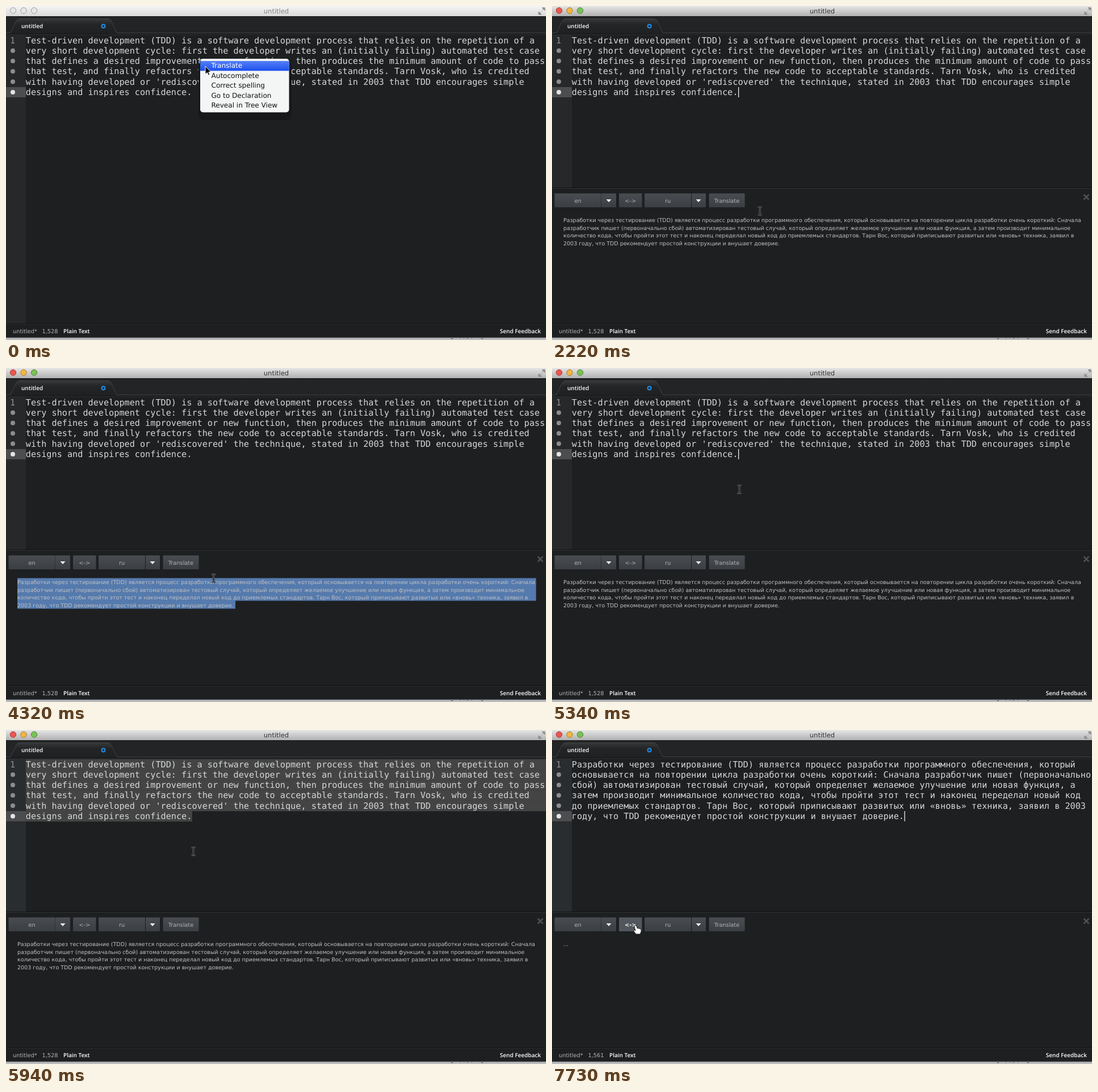
Recreate the animation shown at these times as an HTML page. Size 951x589 px, loop 8 s.

```html
<!DOCTYPE html>
<html lang="en">
<head>
<meta charset="utf-8">
<title>Editor translation panel</title>
<style>
html, body { margin: 0; width: 100%; height: 100%; overflow: hidden; background: #1d1f21; }
svg { display: block; width: 951px; height: 589px; }
text { font: 9.8px "DejaVu Sans", sans-serif; fill: #b2b5b7; text-rendering: geometricPrecision; white-space: pre; }
.code { font: 15.2px "DejaVu Sans Mono", monospace; fill: #d6d8d8; }
.bold { font: 600 10px "Open Sans", sans-serif; fill: #fff; }
.mid { text-anchor: middle; }
#menu text { font-size: 12.05px; fill: #111; }
#title { font-size: 11.5px; }
#result { font-size: 9.5px; fill: #bfc1c2; }
</style>
</head>
<body>
<svg viewBox="0 0 951 589">
  <defs>
    <linearGradient id="idle" x2="0" y2="1"><stop stop-color="#f5f5f5"/><stop offset="1" stop-color="#d9d9d9"/></linearGradient>
    <linearGradient id="live" x2="0" y2="1"><stop stop-color="#e6e6e6"/><stop offset="1" stop-color="#b0b0b0"/></linearGradient>
    <linearGradient id="tab" x2="0" y2="1"><stop stop-color="#36383a"/><stop offset=".35" stop-color="#232527"/><stop offset="1" stop-color="#1d1f21"/></linearGradient>
    <linearGradient id="btn" x2="0" y2="1"><stop stop-color="#494d51"/><stop offset="1" stop-color="#3b3f43"/></linearGradient>
    <linearGradient id="blue" x2="0" y2="1"><stop stop-color="#5580f6"/><stop offset="1" stop-color="#1c50ee"/></linearGradient>
  </defs>
  <rect width="951" height="589" fill="#1d1f21"/>

  <rect id="bar" width="951" height="18"/>
  <g id="lights"></g>
  <text id="title" class="mid" x="476" y="12.7">untitled</text>
  <path d="M944 3h5v5zM938 10v5h5zM948 4l-4 4M939 14l4-4" fill="#8b8b8b" stroke="#8b8b8b"/>

  <rect y="18" width="951" height="32" fill="#222426"/>
  <rect y="18" width="951" height="1" fill="#121314"/>
  <path d="M0 47.500H8L18 26Q20 22.500 24 22.500H179Q183 22.500 185 26L195 47.500H951V51H0Z" fill="url(#tab)" stroke="#3f4244"/>
  <path d="M0 49.500H951" stroke="#141516"/>
  <text class="bold" x="27" y="38.500">untitled</text>
  <circle cx="171.500" cy="35.500" r="3" fill="none" stroke="#1d8fea" stroke-width="2"/>

  <rect y="51" width="951" height="510" fill="#1d1f21"/>
  <rect y="51" width="35" height="510" fill="#262829"/>
  <rect id="gutter" y="51" height="510" fill="#2a2d30"/>
  <rect y="143" width="35" height="18" fill="#4b4d4f"/>
  <g id="dots"></g>
  <text class="code" x="7" y="65.500" style="fill:#8e9092">1</text>
  <g id="picked" fill="#444"></g>
  <text id="code" class="code"></text>
  <rect id="caret" y="143" width="1.200" height="18" fill="#fff"/>

  <g id="panel">
    <rect y="320" width="951" height="242" fill="#1d1f21"/>
    <rect y="320" width="951" height="1" fill="#0e0f10"/>
    <rect y="321" width="951" height="1" fill="#343638"/>
    <g id="buttons"></g>
    <path d="M95.500 341h9l-4.500 5zM253.500 341h9l-4.500 5z" fill="#f2f2f2"/>
    <path d="M936.500 332.500l9 9m0-9l-9 9" stroke="#4d4f51" stroke-width="2.600"/>
    <path id="marked" d="M20 370.500H933.500V410.500H404V424.500H20Z" fill="#557aad"/>
    <text id="result"></text>
    <rect id="caret2" x="365" y="370" width="1" height="13" fill="#bbb"/>
  </g>

  <rect y="560" width="951" height="1" fill="#111213"/>
  <rect y="561" width="951" height="1" fill="#2b2d2f"/>
  <text x="12" y="577">untitled*</text>
  <text id="count" x="63.500" y="577"></text>
  <text class="bold" x="101" y="577">Plain Text</text>
  <text class="bold" x="942" y="577" text-anchor="end">Send Feedback</text>
  <rect y="585" width="951" height="4" fill="#b9bbbc"/>
  <rect y="584.500" width="951" height="1" fill="#77797a"/>
  <path d="M784 586.500h3M799 586h1M806 586h1M812 586h2M820 586h1M837 586.500h3" stroke="#444"/>

  <g id="menu">
    <rect x="339" y="97" width="164" height="104" rx="9" fill="#17181a"/>
    <rect x="342" y="93" width="156.500" height="94.500" rx="5" fill="#f4f5f5"/>
    <rect id="hot" x="342" y="97" width="156.500" height="17.300" fill="url(#blue)"/>
  </g>

  <g id="pointer">
    <path id="arrow" d="M0 0V14.500L3.400 11.400L5.700 16.300L8 15.200L5.700 10.500H10Z" fill="#050505" stroke="#fff"/>
    <g id="beam" fill="none">
      <path id="stem" d="M-3.500-7Q0-7 0-5Q0-7 3.500-7M0-5V5M-3.500 7Q0 7 0 5Q0 7 3.500 7M-2 2H2" stroke="#777" stroke-width="2.600"/>
      <use href="#stem" style="display:none"/>
      <path d="M-3.500-7Q0-7 0-5Q0-7 3.500-7M0-5V5M-3.500 7Q0 7 0 5Q0 7 3.500 7M-2 2H2" stroke="#111"/>
    </g>
    <path id="hand" d="M-1 0Q1-1 2 1L3.500 5Q5 3.500 6.200 5.200Q7.800 4.300 8.500 6Q10 5.500 10 7.500V11L8 15H1L-3 10Q-4 7.500-2 7.500L0 9L-2 2Q-2.200.500-1 0Z" fill="#fff" stroke="#111"/>
  </g>
</svg>
<script>
const LOOP = 8000, STEP = 148.6, ROW = 18.3, COL = 9.151;
const english = "Test-driven development (TDD) is a software development process that relies on the repetition of a very short development cycle: first the developer writes an (initially failing) automated test case that defines a desired improvement or new function, then produces the minimum amount of code to pass that test, and finally refactors the new code to acceptable standards. Tarn Vosk, who is credited with having developed or 'rediscovered' the technique, stated in 2003 that TDD encourages simple designs and inspires confidence.";
const russian = "Разработки через тестирование (TDD) является процесс разработки программного обеспечения, который основывается на повторении цикла разработки очень короткий: Сначала разработчик пишет (первоначально сбой) автоматизирован тестовый случай, который определяет желаемое улучшение или новая функция, а затем производит минимальное количество кода, чтобы пройти этот тест и наконец переделал новый код до приемлемых стандартов. Тарн Вос, который приписывают развитых или «вновь» техника, заявил в 2003 году, что TDD рекомендует простой конструкции и внушает доверие.";

const $ = id => document.getElementById(id);
const show = (id, on) => $(id).style.display = on ? "" : "none";
const set = (id, attrs) => { for (const k in attrs) $(id).setAttribute(k, attrs[k]); };
const add = (id, markup) => $(id).insertAdjacentHTML("beforeend", markup);
const wrap = (s, n) => s.match(new RegExp(`.{1,${n}}(?: |$)`, "g")).map(l => l.trimEnd());
const lines = (rows, x, y, pitch) => rows.map((r, i) =>
  `<tspan x="${x}" y="${y + i * pitch}">${r}</tspan>`).join("");

const code = [english, russian].map(s => lines(wrap(s, 100), 34.800, 65.500, ROW));
const translation = lines(wrap(russian, 166), 20, 381, 13.700);
const waiting = lines(["..."], 20, 381, 0);

for (let i = 0; i < 6; i++) {
  if (i) add("dots", `<circle cx="12" cy="${60.4 + i * ROW}" r="4" fill="${i < 5 ? "#8b8d8e" : "#e4e4e4"}"/>`);
  add("picked", `<rect x="35" y="${51.500 + i * ROW}" width="${i < 5 ? 916 : 32 * COL}" height="18.500"/>`);
}
for (const x of [12.500, 31, 49.500]) add("lights", `<circle cx="${x}" cy="8" r="5.200"/>`);
["Translate", "Autocomplete", "Correct spelling", "Go to Declaration", "Reveal in Tree View"].forEach((s, i) =>
  add("menu", `<text x="361.500" y="${109.300 + i * 17.400}">${s}</text>`));
[[4.500, 82, "en"], [87, 26, ""], [118, 40.500, "&lt;-&gt;", "swap"], [163, 82, "ru"], [246, 25, ""], [276.500, 63, "Translate"]]
  .forEach(([x, w, s, id = ""]) => add("buttons", `<g id="${id}"><rect x="${x}" y="330.500" width="${w}" height="24.500" rx="1" fill="url(#btn)"/>
    <text class="mid" x="${x + w / 2}" y="346.500">${s}</text></g>`));

// Pointer path: time, x, y
const path = [[0, 351, 106], [1400, 351, 106], [2370, 367, 377], [4250, 367, 377],
  [4760, 330, 214], [6400, 330, 214], [7130, 147, 345], [LOOP, 147, 345]];

function pointerAt(t) {
  const i = path.findIndex(p => p[0] > t);
  const [t0, x0, y0] = path[i - 1], [t1, x1, y1] = path[i];
  const u = (t - t0) / (t1 - t0), e = u * u * (3 - 2 * u);
  return [x0 + (x1 - x0) * e, y0 + (y1 - y0) * e];
}

const cache = {};
function fill(id, markup) {
  if (cache[id] !== markup) $(id).innerHTML = cache[id] = markup;
}

function draw(t) {
  const within = (a, b) => t >= a && t < b;
  const active = t >= 1930, pasted = t >= 6390;

  set("bar", { fill: active ? "url(#live)" : "url(#idle)" });
  $("title").style.fill = active ? "#333" : "#858585";
  [...$("lights").children].forEach((c, i) => {
    c.setAttribute("fill", active ? ["#ee5550", "#f3b640", "#79c257"][i] : "#e6e6e6");
    c.setAttribute("stroke", active ? ["#a8403c", "#a87c2c", "#4d8638"][i] : "#9b9b9b");
  });

  show("menu", t < 440);
  show("hot", t < 290);
  $("menu").querySelector("text").style.fill = t < 290 ? "#fff" : "#111";

  set("gutter", t < 5940 ? { x: 20, width: t < 5490 ? 0 : 15 } : { x: 0, width: 35 });
  show("picked", within(5940, 6390));
  fill("code", code[+pasted]);
  fill("count", pasted ? "1,561" : "1,528");
  set("caret", { x: pasted ? 620.500 : 328 });
  show("caret", within(1930, 2670) || within(5050, 5490) || within(6390, 7130) || t >= 7730);

  show("panel", t >= 890);
  show("marked", within(3420, 5050));
  show("caret2", within(2970, 3420));
  fill("result", within(1190, 7430) ? translation : waiting);

  const [x, y] = pointerAt(Math.min(LOOP - 1, Math.floor((t + 8) / STEP) * STEP));
  const hover = t > 6400 && x < 159 && y > 330;
  const beam = active && !hover && (t < 6400 || y < 320);
  set("pointer", { transform: `translate(${x} ${y})` });
  show("hand", hover);
  show("beam", beam);
  show("arrow", !hover && !beam);
  const [face, label] = $("swap").children;
  face.setAttribute("fill", hover ? "#51575c" : "url(#btn)");
  label.style.fill = hover ? "#fff" : "";
  label.style.fontWeight = hover ? "bold" : "";
}

const start = performance.now();
function frame() {
  draw((performance.now() - start) % LOOP);
  requestAnimationFrame(frame);
}
frame();
</script>
</body>
</html>
```
